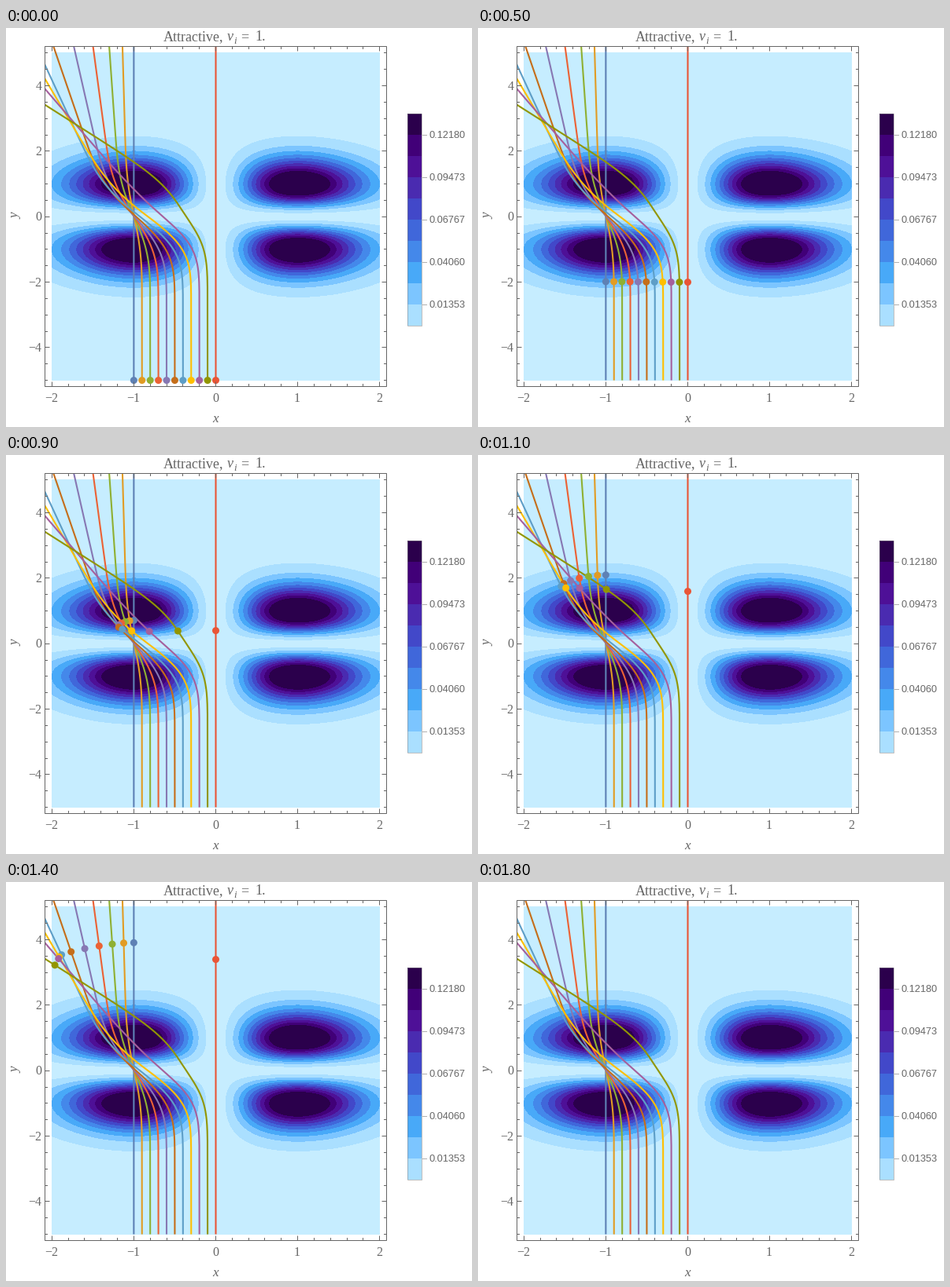
Recreate the animation shown at these times as a matplotlib script. Size 592 by 508 pixels, loop 5 s.

```python
import math

import numpy as np
import matplotlib.pyplot as plt
from matplotlib.animation import FuncAnimation
from matplotlib.patches import Rectangle

W, H, DPI = 592, 508, 64
PT = 72 / DPI                                # points per pixel
LEFT, RIGHT, TOP, BOTTOM = 49.9, 483.1, 23.6, 456.9
XMAX, YMAX = 2.08, 5.2
MASS, STEP, SUBSTEPS, MOVING = 0.5, 0.01, 60, 18
GRAY = "#666666"
LINE_COLORS = ["#5e81b5", "#e19c24", "#8fb032", "#eb6235", "#8778b3", "#c56e1a",
               "#5d9ec7", "#ffbf00", "#a5609d", "#929600", "#e95536"]
BACKGROUND = "#c6edff"
BANDS = ["#aadfff", "#7cc5ff", "#48a9f8", "#4488ea", "#4067da",
         "#4248c9", "#4a2bb0", "#4e1097", "#410078", "#2b004c"]

plt.rcParams["path.snap"] = False


def potential(x, y):
    return x**2 * y**2 * np.exp(-x**2 - y**2)


def derivative(state):
    x, y, vx, vy = state
    k = 2 * np.exp(-x**2 - y**2) / MASS
    return np.array([vx, vy, k * x * y**2 * (1 - x**2), k * y * x**2 * (1 - y**2)])


def trajectories(x0):
    """Runge-Kutta paths of particles fired upwards from y = -5."""
    state = np.array([x0, np.full_like(x0, -5), np.zeros_like(x0), np.ones_like(x0)])
    path = [state[:2]]
    for _ in range(MOVING * SUBSTEPS):
        a = derivative(state)
        b = derivative(state + STEP / 2 * a)
        c = derivative(state + STEP / 2 * b)
        d = derivative(state + STEP * c)
        state = state + STEP / 6 * (a + 2 * b + 2 * c + d)
        path.append(state[:2])
    return np.array(path)


def px(x):
    return LEFT + (x + XMAX) / (2 * XMAX) * (RIGHT - LEFT)


def py(y):
    return BOTTOM - (y + YMAX) / (2 * YMAX) * (BOTTOM - TOP)


def center(v):
    """Middle of the pixel that holds v, for crisp one-pixel lines."""
    return math.floor(v) + 0.5


fig = plt.figure(figsize=(W / DPI, H / DPI), dpi=DPI, facecolor="white")
plot = fig.add_axes([LEFT / W, 1 - BOTTOM / H, (RIGHT - LEFT) / W, (BOTTOM - TOP) / H])
plot.set(xlim=(-XMAX, XMAX), ylim=(-YMAX, YMAX))
plot.axis("off")
page = fig.add_axes([0, 0, 1, 1])
page.set(xlim=(0, W), ylim=(H, 0))
page.axis("off")


def label(x, y, text, size=16, family="Liberation Serif", **kw):
    kw = {"color": GRAY, "ha": "center", "va": "baseline", **kw}
    page.text(x, y, text, fontsize=size * PT, family=family, **kw)


def stroke(xs, ys, color=GRAY):
    page.plot(xs, ys, color=color, lw=PT, solid_capstyle="butt")


def outline(x0, y0, x1, y1, color):
    page.add_patch(Rectangle((x0, y0), x1 - x0, y1 - y0, fill=False, ec=color, lw=PT))


def minus(n):
    return str(n).replace("-", "\u2212")


# Potential
X, Y = np.meshgrid(np.linspace(-2, 2, 241), np.linspace(-5, 5, 401))
spacing = 0.08 * np.exp(-2)
levels = [-1] + [spacing * (i + 0.5) for i in range(10)] + [1]
plot.contourf(X, Y, potential(X, Y), levels=levels, colors=[BACKGROUND] + BANDS,
              antialiased=False)

# Paths and particles
paths = trajectories(np.linspace(-1, 0, 11))
for i, color in enumerate(LINE_COLORS):
    plot.plot(paths[:, 0, i], paths[:, 1, i], color=color, lw=2.1 * PT, zorder=3,
              solid_capstyle="butt")
dots = plot.scatter(*paths[0], s=(9 * PT)**2, c=LINE_COLORS, linewidths=0, zorder=4)

# Frame and ticks
left, right, top, bottom = map(center, (LEFT, RIGHT, TOP, BOTTOM))
outline(left, top, right, bottom, GRAY)
for i in range(-10, 11):
    size = 6 if i % 5 == 0 else 3.5
    x = center(px(i / 5))
    stroke([x, x], [bottom, bottom - size])
    stroke([x, x], [top, top + size])
    size = 6 if i % 4 == 0 else 3.5
    y = center(py(i / 2))
    stroke([left, left + size], [y, y])
    stroke([right, right - size], [y, y])
for n in range(-2, 3):
    label(px(n) - 0.5, 475.5, minus(n))
    label(45.5, py(2 * n) + 5, minus(2 * n), ha="right")

# Titles
label(200, 16, "Attractive,", 18, ha="left")
label(281, 16, "v", 18, ha="left", style="italic")
label(289.5, 19.5, "i", 13, ha="left", style="italic")
label(298, 16, "=", 18, ha="left")
label(316, 16, "1.", 18, ha="left")
label(266, 502, "x", 17, style="italic")
label(12, 239.5, "y", 17, style="italic", rotation=90, va="center")

# Legend
for i, color in enumerate(BANDS):
    page.add_patch(Rectangle((510, 352 - 27 * i), 18, 27, fc=color, lw=0,
                             antialiased=False))
outline(510.5, 109.5, 528.5, 379.5, "#80808080")
for i in range(1, 10, 2):
    y = 379.5 - 27 * i
    stroke([529, 535], [y, y], "#b0b0b0")
    label(537, y + 3.5, f"{np.exp(-2) / 10 * i:.5f}", 12.8, "Liberation Sans", ha="left")


def update(frame):
    dots.set_offsets(paths[min(frame, MOVING) * SUBSTEPS].T)
    return [dots]


anim = FuncAnimation(fig, update, frames=50, interval=100, repeat=True, repeat_delay=0)
plt.show()
```
